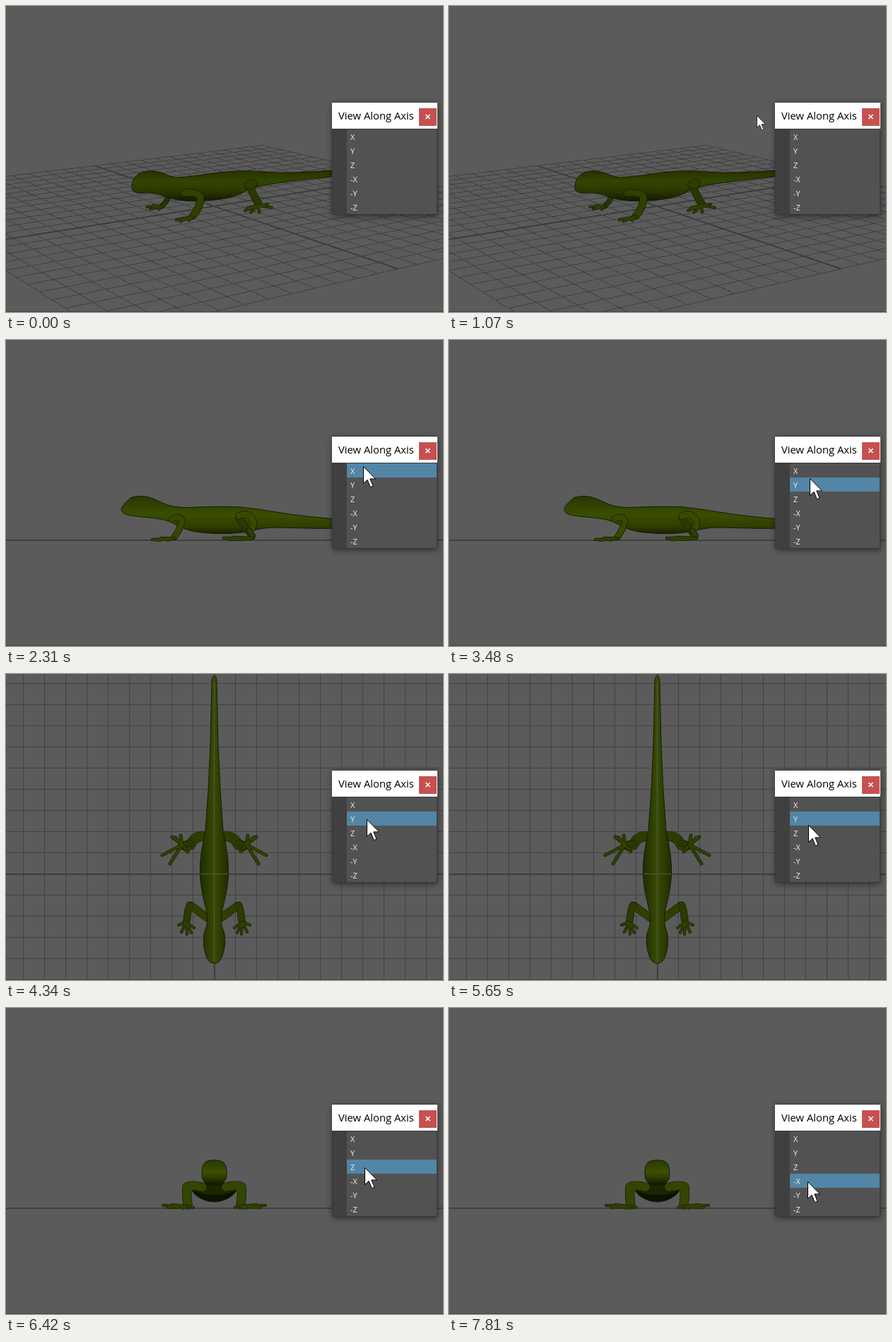
Recreate the animation shown at these times as an HTML page. Size 618x434 px, loop 8 s.

```html
<!DOCTYPE html>
<html lang="en">
<head>
<meta charset="utf-8">
<title>View Along Axis</title>
<style>
  html, body { margin: 0; width: 100%; height: 100%; overflow: hidden; background: #5b5b5b; }
  svg { display: block; width: 618px; height: 434px; }
  text { font-family: "Open Sans", "Noto Sans", sans-serif; }
  .grid path { fill: none; stroke: #424242; stroke-width: 1; shape-rendering: crispEdges; }
  .grid .axis { stroke: #3d3d3d; stroke-width: 2; }
  .skin { stroke: #141c00; stroke-width: 1; stroke-linejoin: round; }
  .limb { fill: none; stroke-linecap: round; stroke-linejoin: round; }
  .items { font-size: 11px; fill: #ececec; }
</style>
</head>
<body>
<svg viewBox="0 0 618 434" xmlns="http://www.w3.org/2000/svg">
  <defs>
    <linearGradient id="side" x2="0" y2="1">
      <stop offset="0" stop-color="#243100"/>
      <stop offset=".35" stop-color="#334500"/>
      <stop offset=".65" stop-color="#2b3a00"/>
      <stop offset="1" stop-color="#121900"/>
    </linearGradient>
    <linearGradient id="flank" x2="0" y2="1">
      <stop offset="0" stop-color="#293800"/>
      <stop offset=".5" stop-color="#3a4e00"/>
      <stop offset=".8" stop-color="#303f00"/>
      <stop offset="1" stop-color="#192200"/>
    </linearGradient>
    <linearGradient id="back">
      <stop offset="0" stop-color="#202c00"/>
      <stop offset=".5" stop-color="#384b00"/>
      <stop offset="1" stop-color="#202c00"/>
    </linearGradient>
    <linearGradient id="face" x2="0" y2="1">
      <stop offset="0" stop-color="#2a3900"/>
      <stop offset=".5" stop-color="#3b5000"/>
      <stop offset=".75" stop-color="#283600"/>
      <stop offset="1" stop-color="#0d1300"/>
    </linearGradient>
    <filter id="soft" x="-20%" y="-20%" width="140%" height="140%"><feGaussianBlur stdDeviation="5"/></filter>
  </defs>
  <rect width="618" height="434" fill="#5b5b5b"/>
  <g id="views"></g>
  <rect y="433" width="618" height="1" fill="#434343"/>

  <rect x="462" y="139" width="148" height="159" fill="#000" opacity=".5" filter="url(#soft)"/>
  <rect x="461" y="136" width="149" height="160" fill="#333a3f"/>
  <rect x="461" y="137" width="149" height="37" fill="#fff"/>
  <rect x="462" y="175" width="20" height="120" fill="#404040"/>
  <rect x="482" y="175" width="127" height="120" fill="#525252"/>
  <rect id="row" x="482" width="127" height="20" fill="#5285a6"/>
  <text x="470" y="161" font-size="14.8">View Along Axis</text>
  <rect x="584" y="145" width="25" height="25" fill="#c75050"/>
  <path d="M593.5 154l6 6m0-6l-6 6" stroke="#fff" stroke-width="1.6"/>
  <g class="items" id="items"></g>

  <circle id="click" r="15" fill="#ff0" opacity=".55"/>
  <path id="cursor" d="M0 0V24L5.6 18.8L9.9 29.2L13.6 27.6L9.3 17.4H17Z" fill="#fff" stroke="#000" stroke-linejoin="round"/>
</svg>
<script>
const $ = id => document.getElementById(id);
const LOOP = 8000, TOP = 175, ROW = 20;
const CX = 294, CY = 284, UNIT = 30.2, HALF = 12;

// Grid on the ground plane, seen by a camera aimed at the origin
const cam = { cos: 0.565, sin: 0.825, tilt: 0.2336, dist: 45 };
function project(x, z) {
  const right = x * cam.cos - z * cam.sin;
  const away = -x * cam.sin - z * cam.cos;
  const k = UNIT / (1 + away * Math.sqrt(1 - cam.tilt ** 2) / cam.dist);
  return `${(CX + right * k).toFixed(2)} ${(CY - away * cam.tilt * k).toFixed(2)}`;
}
const flat = (x, z) => `${CX + 0.5 + x * 30} ${CY - 0.5 + z * 30}`;

function grid(place) {
  let thin = '', axis = '';
  for (let i = -HALF; i <= HALF; i++) {
    const d = `M${place(i, -HALF)}L${place(i, HALF)}M${place(-HALF, i)}L${place(HALF, i)}`;
    if (i) thin += d; else axis = d;
  }
  return `<g class="grid"><path d="${thin}"/><path class="axis" d="${axis}"/></g>`;
}
const horizon = '<rect y="283" width="618" height="2" fill="#404040"/>';

// Lizard parts
const skin = (d, fill) => `<path class="skin" d="${d}" fill="${fill}"/>`;
const limb = (d, w, color = '#2f4000') =>
  `<path class="limb" d="${d}" stroke="#141c00" stroke-width="${w + 1.4}"/>` +
  `<path class="limb" d="${d}" stroke="${color}" stroke-width="${w}"/>`;
const toes = (x, y, tips, w = 2.6) =>
  limb(tips.map(([tx, ty]) => `M${x} ${y}L${tx} ${ty}`).join(''), w);
const mirrored = part => part + `<g transform="translate(589 0) scale(-1 1)">${part}</g>`;

function perspective() {
  return grid(project) +
    limb('M229 272L226 278L220 284', 6, '#263400') +
    toes(220, 284, [[199, 285], [204, 288], [216, 289], [208, 283]], 2) +
    skin('M178 258C178 250 181 241 190 237C199 233 213 234 221 237C229 240 236 244 244 243' +
      'C265 242 285 238 302 236C320 234 345 233 362 235C395 238 430 235 466 233V241' +
      'C435 245 405 248 378 252C361 255 350 257 338 263C326 271 302 275 282 276' +
      'C262 278 243 276 230 272C217 267 208 264 197 265C188 266 178 265 178 258Z', 'url(#side)') +
    limb('M252 265C264 264 274 266 275 271C275 281 272 289 264 298', 9.5, '#2f4000') +
    toes(264, 299, [[241, 303], [247, 305], [259, 304], [251, 302]], 2.6) +
    limb('M344 254C348 263 351 271 357 280', 9.5, '#293800') +
    limb('M344 253L349 252', 12, '#2d3d00') +
    toes(357, 283, [[338, 290], [342, 286], [346, 293], [358, 293], [376, 286], [370, 281]], 2.6);
}

function sideOn() {
  return horizon +
    skin('M163 240C164 234 172 228 176 224C182 221 194 221 202 223C211 225 219 231 229 234' +
      'C242 238 257 238 270 237C294 236 315 236 332 237C363 240 395 247 425 250L466 254V267' +
      'C430 268 405 266 380 266C364 266 355 269 340 272C316 276 290 275 268 272' +
      'C251 269 240 261 230 257C216 252 199 252 184 250C174 249 163 247 163 240Z', 'url(#flank)') +
    limb('M234 254C243 249 251 252 248 260C246 269 241 275 238 280', 8, '#364900') +
    toes(238, 281, [[207, 283], [213, 284], [228, 284], [219, 281]], 2.6) +
    limb('M329 252L348 278', 8.5, '#2c3b00') +
    limb('M329 250C339 244 349 249 350 260C350 264 347 268 344 270', 8.5, '#374a00') +
    limb('M344 270L349 278', 6, '#2f4000') +
    toes(350, 281, [[308, 281], [315, 283], [330, 283], [321, 280]], 3);
}

function above() {
  const legs =
    limb('M286 232C274 227 265 233 261 242L254 244', 13, '#2d3d00') +
    limb('M261 240L248 243', 8, '#2a3800') +
    toes(249, 242, [[235, 231], [247, 229], [221, 257], [232, 269], [239, 232], [257, 252]], 3.4) +
    limb('M285 346L262 329', 10, '#303f00') +
    limb('M260 328C256 336 257 345 255 352', 9, '#2c3b00') +
    toes(255, 352, [[244, 356], [248, 366], [256, 369], [262, 367], [266, 360]], 2.6);
  const body = 'M294.5 3C297 3 298 6 298 12L300 100L303 165L307 222C309 235 314 252 314.5 275' +
    'C315 300 310 317 306 334C304 346 304 352 306 360C312 372 310 390 305 402' +
    'C301 413 288 413 284 402C279 390 277 372 283 360C285 352 285 346 283 334' +
    'C279 317 274 300 274.5 275C275 252 280 235 282 222L286 165L289 100L291 12C291 6 292 3 294.5 3Z';
  return grid(flat) + mirrored(legs) + skin(body, 'url(#back)') +
    `<g opacity=".18">${grid(flat)}</g>` +
    '<path d="M294.5 12V408M275 283.5H314" stroke="#505a4c" stroke-width="1.4" opacity=".75"/>';
}

function headOn() {
  const arm =
    limb('M278 254C268 252 260 251 256 254C255 264 256 272 257 279', 12, '#334500') +
    toes(257, 281, [[222, 280], [229, 283], [240, 283], [250, 284], [265, 283], [235, 279]], 2.6);
  return horizon +
    skin('M262 254C275 246 314 246 327 254C327 264 310 275 294.5 275C279 275 262 264 262 254Z', '#0c1100') +
    skin('M264 257C274 248 315 248 325 257C315 268 274 268 264 257Z', '#1b2500') +
    mirrored(arm) +
    skin('M283 218C288 215 301 215 306 218C311 221 312 228 312 236C312 246 306 251 294.5 251' +
      'C283 251 277 246 277 236C277 228 278 221 283 218Z', 'url(#face)');
}

const views = [[0, perspective], [2310, sideOn], [4340, above], [6420, headOn]];
$('views').innerHTML = views.map(([, draw]) => `<g>${draw()}</g>`).join('');
$('items').innerHTML = ['X', 'Y', 'Z', '-X', '-Y', '-Z']
  .map((s, i) => `<text x="487" y="${TOP + 15 + i * ROW}">${s}</text>`).join('');

// Pointer moves: first step, last step, step count, from, to
const moves = [
  [530, 1070, 8, [68, 108], [435, 155]],
  [1147, 1300, 3, [458, 160], [483, 168]],
  [1380, 1610, 4, [493, 176], [505, 179]],
  [3160, 3160, 1, [507, 185], [507, 185]],
  [3410, 3710, 5, [509.6, 190], [510, 206]],
  [5650, 5890, 4, [508, 214], [507, 226]],
  [7660, 7810, 3, [507, 230], [507, 246]]
];
const clicks = [[1990, 2310], [4170, 4340], [6270, 6420]];

function pointer(t) {
  const move = moves.filter(m => t >= m[0]).pop();
  if (!move) return null;
  const [t0, t1, n, from, to] = move;
  if (n < 2) return to;
  const gap = (t1 - t0) / (n - 1);
  const step = Math.min(n - 1, Math.floor((t - t0) / gap + 0.15));
  const k = 1 - (1 - step / (n - 1)) ** 1.7;
  return from.map((v, i) => Math.round(v + (to[i] - v) * k));
}

const show = (el, on) => el.setAttribute('display', on ? 'inline' : 'none');

function render(t) {
  const current = views.filter(v => t >= v[0]).length - 1;
  [...$('views').children].forEach((g, i) => show(g, i === current));

  const pos = pointer(t);
  show($('cursor'), pos);
  show($('row'), pos && pos[1] >= TOP);
  show($('click'), clicks.some(([a, b]) => t >= a && t < b));
  if (!pos) return;
  const [x, y] = pos;
  const size = x < 461 ? 0.7 : 1;
  $('cursor').setAttribute('transform', `translate(${x + 0.5} ${y + 0.5}) scale(${size})`);
  $('click').setAttribute('transform', `translate(${x} ${y})`);
  $('row').setAttribute('y', TOP + ROW * Math.floor((y - TOP) / ROW));
}

const start = performance.now();
function tick() {
  render((performance.now() - start) % LOOP);
  requestAnimationFrame(tick);
}
tick();
</script>
</body>
</html>
```
